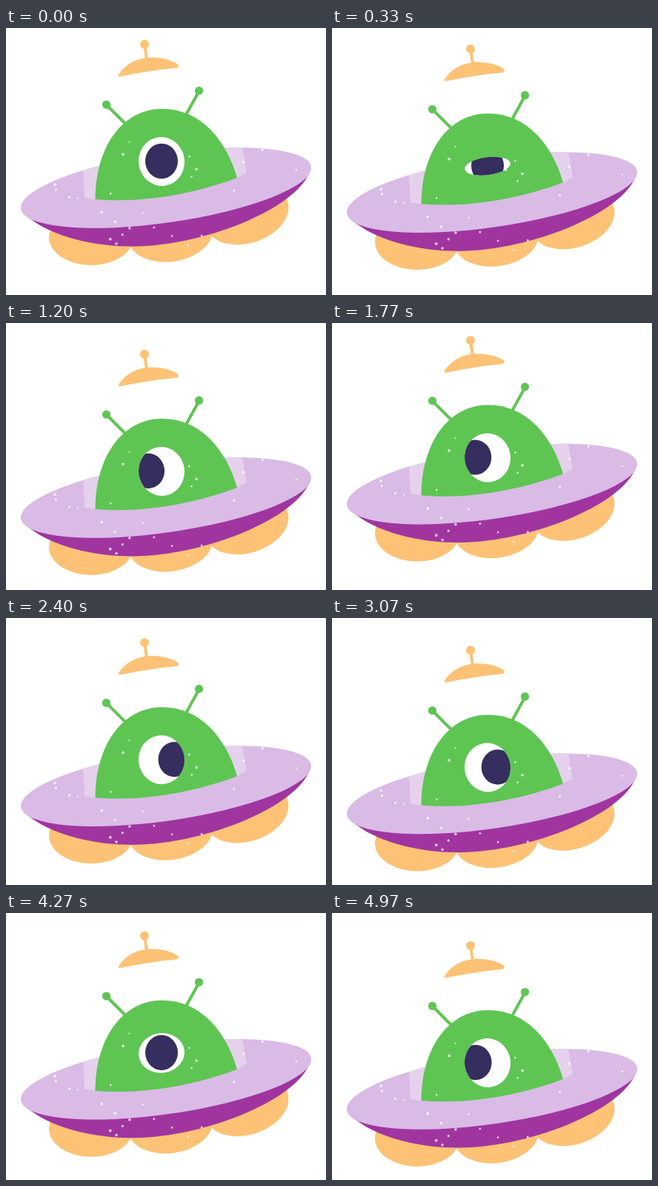
These frames come from a looping animation (432 by 360 pixels, 5.07 s). An HTML page:

```html
<!DOCTYPE html>
<html lang="en">
<head>
<meta charset="utf-8">
<title>Hovering saucer</title>
<style>
  html, body { margin: 0; width: 100%; height: 100%; overflow: hidden; background: #fff; }
  svg { display: block; width: 432px; height: 360px; }
  .orange { fill: #fdc275; stroke: #fdc275; }
  .green { fill: #5ec553; stroke: #5ec553; }
  .orange, .green { stroke-width: 0; }
  .stem { fill: none; stroke-width: 4; stroke-linecap: round; }
</style>
</head>
<body>
<svg viewBox="0 0 432 360">
  <defs>
    <ellipse id="disc" cx="216" cy="215.5" rx="198" ry="46.8" transform="rotate(-8.25 216 215.5)"/>
    <ellipse id="eye" cx="210" cy="180" rx="31" ry="33" transform="rotate(-7.5 210 180)"/>
    <clipPath id="discClip"><use href="#disc"/></clipPath>
    <clipPath id="eyeClip"><use href="#eye"/></clipPath>
  </defs>
  <g id="ship">
    <g class="orange">
      <ellipse cx="115" cy="282" rx="57" ry="38"/>
      <ellipse cx="222" cy="279" rx="57" ry="36" transform="rotate(-8 222 279)"/>
      <ellipse cx="325.5" cy="252" rx="57.5" ry="38" transform="rotate(-18 325.5 252)"/>
      <path d="M152 63C160 50 175 41 192 40C208 39 224 43 232 49C234 52 232 53.5 229 54C205 56 180 60 156 65C152 66 151 65 152 63Z"/>
      <circle cx="187" cy="22" r="6"/>
      <path class="stem" d="M187.5 26L190 42"/>
    </g>
    <path fill="#a035a0" d="M25 251C60 283 125 295 172 294.5C272 294 402 239 411.5 188Z"/>
    <use href="#disc" fill="#d9bbe6"/>
    <path fill="#e5d1ec" clip-path="url(#discClip)" d="M103.5 180L317 150L325 195L312 202L120.5 231L106 229Z"/>
    <g class="green">
      <path d="M120.5 231C120.5 162 156 109 211 109C262 109 297 150 312 202C262 221 190 237 120.5 231Z"/>
      <circle cx="135.5" cy="103.3" r="5.6"/>
      <circle cx="260.5" cy="84.5" r="5.6"/>
      <path class="stem" d="M137 105L161 129M259 88L243 117"/>
    </g>
    <g id="specks" fill="#fff" fill-opacity=".75" transform="translate(216 216) rotate(-8)"></g>
    <use href="#eye" fill="#fff"/>
    <ellipse id="pupil" cy="179.5" rx="22" ry="23.7" fill="#362e5e"/>
  </g>
</svg>
<script>
const LOOP = 5070, BOB = 1930, LOOK = 2 * BOB, LAST_POSE = 62;
const $ = id => document.getElementById(id);
const ship = $('ship'), eye = $('eye'), pupil = $('pupil');

// The clip stays fixed on the eye while the pupil slides beneath it
const socket = document.createElementNS('http://www.w3.org/2000/svg', 'g');
socket.setAttribute('clip-path', 'url(#eyeClip)');
ship.append(socket);
socket.append(pupil);

function scatterSpecks(count) {
  let seed = 7;
  const random = () => (seed = seed * 16807 % 2147483647) / 2147483647;
  for (let i = 0; i < count; i++) {
    const angle = random() * 2 * Math.PI, reach = Math.sqrt(random());
    const dot = document.createElementNS('http://www.w3.org/2000/svg', 'circle');
    dot.setAttribute('cx', 185 * reach * Math.cos(angle));
    dot.setAttribute('cy', 85 * reach * Math.sin(angle));
    dot.setAttribute('r', 1 + random());
    $('specks').append(dot);
  }
}

function ease(t, from, to) {
  const u = Math.min(1, Math.max(0, (t - from) / (to - from)));
  return u * u * (3 - 2 * u);
}

// 12.5 poses a second, shown on a 30 Hz grid
function poseTime(ms) {
  const tick = Math.floor((ms + 4) * .03);
  const pose = Math.min(LAST_POSE, Math.floor(tick * 5 / 12));
  return Math.ceil(pose * 12 / 5) / .03;
}

function draw(ms) {
  const t = poseTime(ms), look = t % LOOK;
  const y = 11.6 * (1 - Math.cos(2 * Math.PI * t / BOB));
  const open = 1 - .94 * (ease(look, 30, 250) - ease(look, 250, 470));
  const gaze = -18 * ease(look, 600, 1220) + 35.5 * ease(look, 1700, 2300)
    - 17.5 * ease(look, 2900, 3450);
  ship.setAttribute('transform', `translate(0 ${y.toFixed(2)})`);
  eye.setAttribute('ry', 33 * open);
  pupil.setAttribute('cx', 210 + gaze);
}

scatterSpecks(28);
const start = performance.now();
function tick() {
  draw((performance.now() - start) % LOOP);
  requestAnimationFrame(tick);
}
tick();
</script>
</body>
</html>
```
